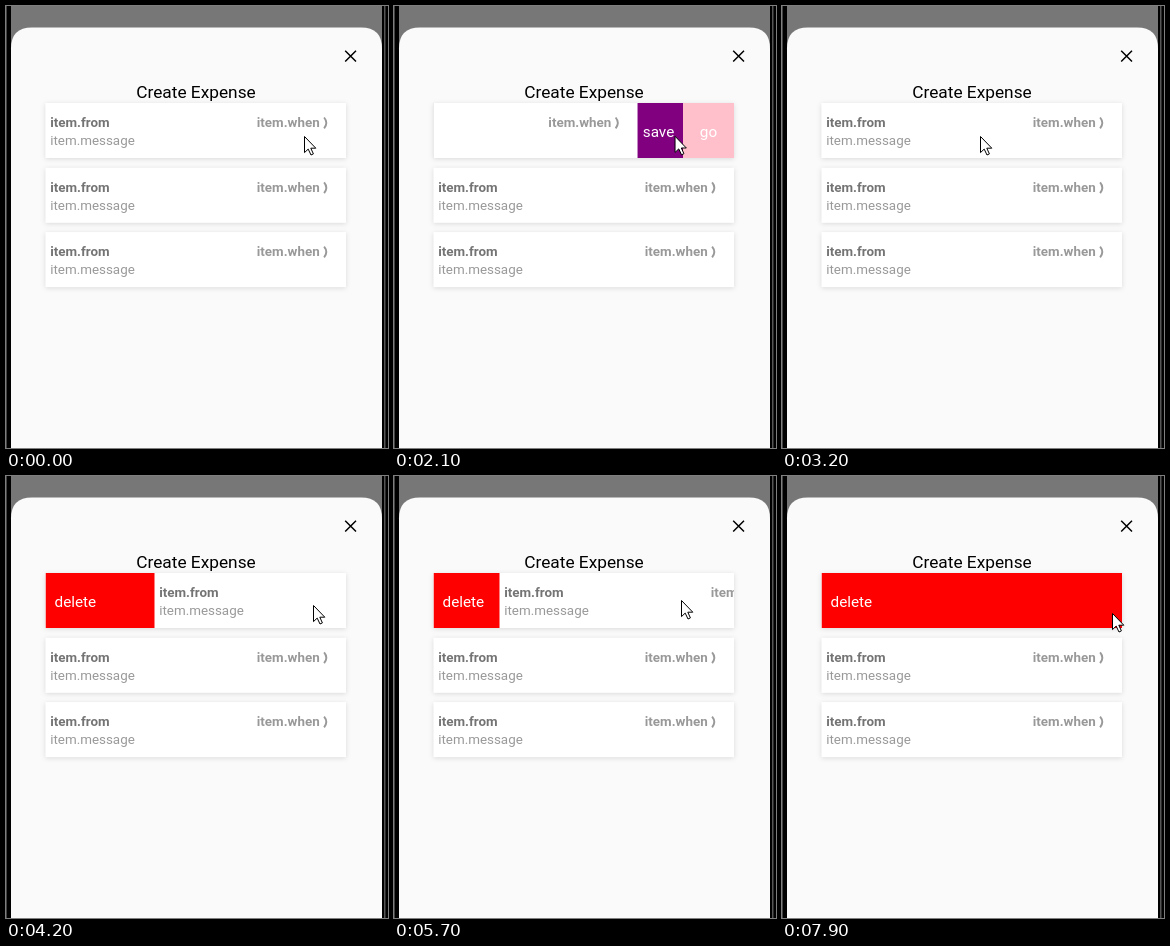
An HTML page for the animation above (8000 ms loop, 382x442 px).

```html
<!DOCTYPE html>
<html>
<head>
<meta charset="utf-8">
<title>Swipeable list</title>
<style>
html, body { margin: 0; width: 100%; height: 100%; overflow: hidden; background: #000; }
svg { display: block; width: 100vw; height: 100vh; font-family: Roboto, Arial, sans-serif; }
.card { fill: #fff; filter: drop-shadow(0 1.5px 2.5px rgba(0, 0, 0, .13)); }
.from, .when, .message { font-size: 13.4px; fill: #999; }
.from, .when { font-weight: bold; }
.from { fill: #747474; }
.action { font-size: 15.3px; fill: #fff; }
.middle { text-anchor: middle; }
</style>
</head>
<body>
<svg viewBox="0 0 382 442">
  <defs>
    <clipPath id="rowClip"><rect width="300.5" height="55"/></clipPath>
    <g id="content">
      <text class="from" x="4.7" y="24">item.from</text>
      <text class="message" x="4.7" y="42">item.message</text>
      <text class="when" x="211.3" y="24">item.when</text>
      <path d="M278.6 14.5Q283 19.7 278.6 25.3" fill="none" stroke="#999" stroke-width="1.9"/>
    </g>
  </defs>
  <rect width="382" height="442"/>
  <rect width="1" height="442" fill="#444"/>
  <rect x="378" width="1.5" height="442" fill="#555"/>
  <rect x="5" width="371" height="60" fill="#777"/>
  <path d="M5 442V42.5Q5 21.5 26 21.5H355Q376 21.5 376 42.5V442Z" fill="#fafafa"/>
  <path d="M339.2 44.7l10.8 10.8m0-10.8l-10.8 10.8" stroke="#000" stroke-width="1.5"/>
  <text class="middle" x="190" y="92.3" font-size="17.3">Create Expense</text>

  <g transform="translate(39.5 97)">
    <rect class="card" width="300.5" height="55"/>
    <g clip-path="url(#rowClip)">
      <g id="left">
        <rect width="300.5" height="55" fill="red"/>
        <text class="action" x="9" y="34">delete</text>
      </g>
      <g id="right">
        <rect width="300.5" height="55" fill="gray"/>
        <rect x="200" width="50" height="55" fill="purple"/>
        <rect x="249.5" width="51" height="55" fill="pink"/>
        <text class="action middle" x="225" y="34">save</text>
        <text class="action middle" x="275" y="34">go</text>
      </g>
      <g id="front">
        <rect width="300.5" height="55" fill="#fff"/>
        <use href="#content"/>
      </g>
    </g>
  </g>
  <g transform="translate(39.5 161.8)">
    <rect class="card" width="300.5" height="55"/>
    <use href="#content"/>
  </g>
  <g transform="translate(39.5 226.1)">
    <rect class="card" width="300.5" height="55"/>
    <use href="#content"/>
  </g>

  <path id="cursor" d="M.5.5V16.6L4.2 13.1L7 19L9.4 17.9L6.8 12.2H11.8Z" fill="#fff" stroke="#000"/>
</svg>
<script>
const LOOP = 8000, STEP = 100;
const ACTIONS = 100, FRICTION = 8, ROW = 300.5;
const $ = id => document.getElementById(id);

// Pointer moves: from time, to time, destination
const moves = [
  [0, 300, 264, 132],
  [900, 1400, 76, 133],
  [1500, 1800, 277, 130],
  [2000, 2500, 311, 128],
  [2700, 3200, 198, 130],
  [3500, 4200, 307, 129],
  [4500, 5200, 221, 127],
  [5300, 6100, 353, 121],
  [6100, 7200, 388, 135],
  [7200, 7900, 330, 137]
];

// The card follows the pointer while held, then settles at rest
const drags = [
  { down: 900, up: 1500, settle: 300, rest: -ACTIONS },
  { down: 2000, up: 2600, settle: 600, rest: 0 },
  { down: 3500, up: 4400, settle: 800, rest: 0 },
  { down: 5300, up: 6000, settle: 600, rest: ROW }
];

const clamp = u => Math.min(1, Math.max(0, u));
const mix = (a, b, u) => a + (b - a) * u;
const smooth = u => u * u * (3 - 2 * u);
const easeOut = u => 1 - (1 - u) ** 2;

function pointerAt(t) {
  let x = 298, y = 130;
  for (const [from, to, toX, toY] of moves) {
    const u = smooth(clamp((t - from) / (to - from)));
    x = mix(x, toX, u);
    y = mix(y, toY, u);
  }
  return [x, y];
}

function cardAt(t) {
  let offset = 0;
  for (const { down, up, settle, rest } of drags) {
    if (t < down) break;
    offset += pointerAt(Math.min(t, up))[0] - pointerAt(down)[0];
    if (offset < -ACTIONS) offset = (offset + ACTIONS) / FRICTION - ACTIONS;
    offset = mix(offset, rest, easeOut(clamp((t - up) / settle)));
  }
  return offset;
}

function draw(now) {
  const t = Math.floor(now % LOOP / STEP) * STEP;
  const dx = cardAt(t);
  $('front').setAttribute('transform', `translate(${dx})`);
  $('left').style.display = dx > 0 ? '' : 'none';
  $('right').style.display = dx < 0 ? '' : 'none';
  $('cursor').setAttribute('transform', `translate(${pointerAt(t)})`);
  $('cursor').style.display = t > 6000 && t < 7300 ? 'none' : '';
}

let start;
function tick(now) {
  start ??= now;
  draw(now - start);
  requestAnimationFrame(tick);
}
draw(0);
requestAnimationFrame(tick);
</script>
</body>
</html>
```
